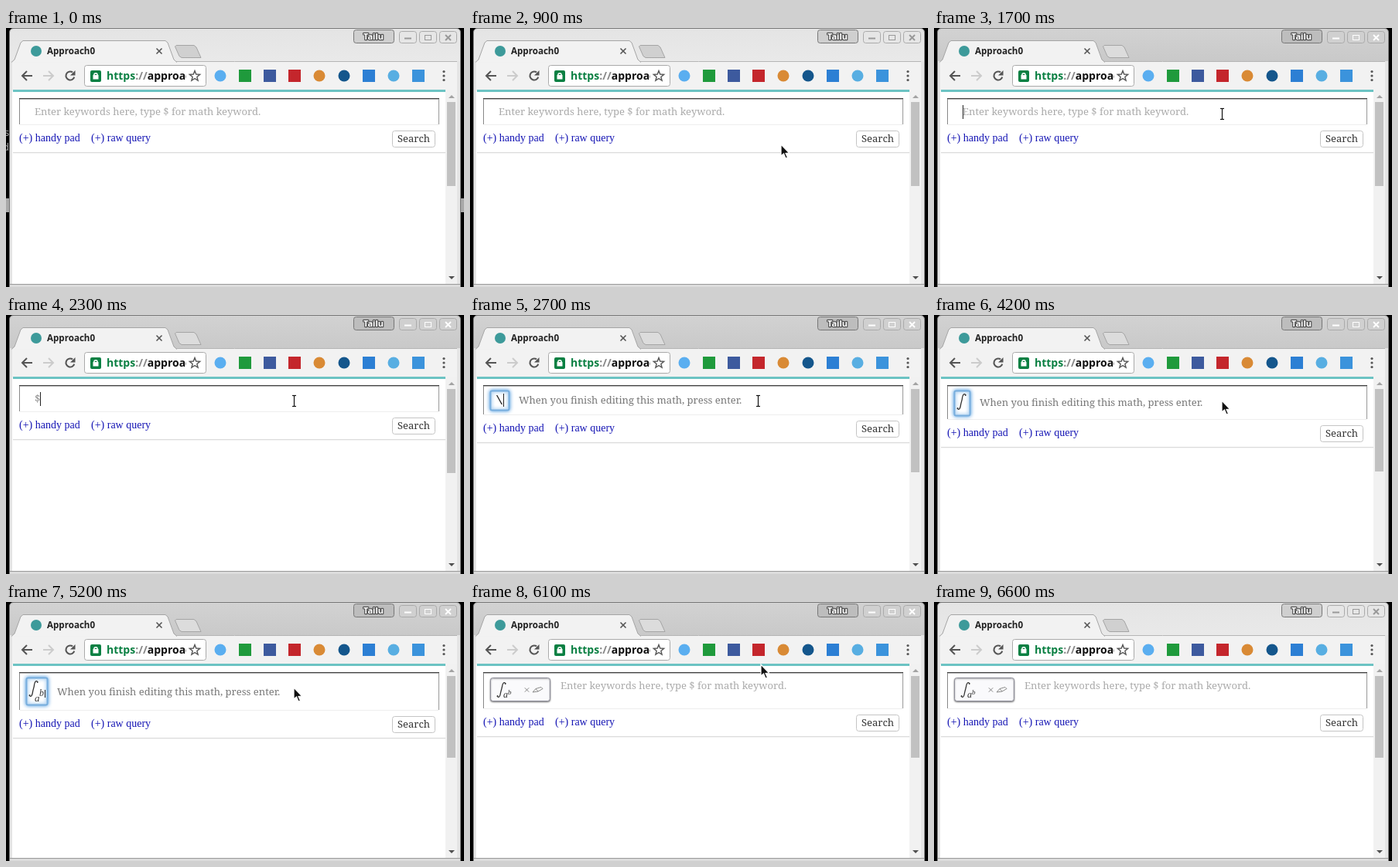
An HTML page with a canvas for the animation above (6.7 s loop, 592x336 px).

```html
<!DOCTYPE html>
<html lang="en">
<head>
<meta charset="utf-8">
<title>Math search box</title>
<style>
  html, body { margin: 0; width: 100%; height: 100%; overflow: hidden; background: #000; }
  canvas { display: block; width: 592px; height: 336px; }
</style>
</head>
<body>
<canvas id="stage" width="592" height="336"></canvas>
<script>
const ctx = document.getElementById('stage').getContext('2d');
const LOOP = 6700, STEP = 100;
const SANS = '"Noto Sans", "Open Sans", sans-serif';
const SERIF = '13px "Noto Serif", serif';
const ROMAN = '"Liberation Serif", "Times New Roman", serif';
const MONO = '16.6px "Liberation Mono", "Courier New", monospace';

const PROMPT = 'Enter keywords here, type $ for math keyword.';
const HINT = 'When you finish editing this math, press enter.';

// Editor states: dh = extra page height, thumb = bottom of scroll thumb
const STATES = [
  { at: 0, dh: 0, thumb: 205, prompt: 37 },
  { at: 2200, dh: 0, thumb: 205, text: '$' },
  { at: 2400, dh: 3, thumb: 205, box: 41, tex: '' },
  { at: 2700, dh: 4, thumb: 204, box: 51, tex: '\\' },
  { at: 3000, dh: 4, thumb: 204, box: 61, tex: '\\i' },
  { at: 3200, dh: 4, thumb: 204, box: 71, tex: '\\in' },
  { at: 3500, dh: 4, thumb: 204, box: 81, tex: '\\int' },
  { at: 3800, dh: 10, thumb: 203, box: 47, math: '' },
  { at: 4600, dh: 13, thumb: 202, box: 48, math: '_' },
  { at: 4700, dh: 13, thumb: 202, box: 49, math: 'a' },
  { at: 5100, dh: 15, thumb: 202, box: 52, math: 'a^' },
  { at: 5200, dh: 15, thumb: 202, box: 54, math: 'ab' },
  { at: 5700, dh: 13, thumb: 202, prompt: 117, chip: true }
];

// Pointer path: time, x, y
const PATH = [
  [300, 145, 291], [500, 262, 222], [700, 386, 166], [800, 409, 152],
  [900, 402, 151], [1100, 401, 152], [1600, 372, 111],
  [6000, 372, 111], [6300, 384, 22]
];

function rect(x, y, w, h, color) {
  ctx.fillStyle = color;
  ctx.fillRect(x, y, w, h);
}

function round(x, y, w, h, r, fill, stroke) {
  ctx.beginPath();
  ctx.roundRect(x, y, w, h, r);
  paint(fill, stroke);
}

function poly(points, fill, stroke, open) {
  ctx.beginPath();
  points.forEach(([x, y]) => ctx.lineTo(x, y));
  if (!open) ctx.closePath();
  paint(fill, stroke);
}

function circle(x, y, r, fill, stroke) {
  ctx.beginPath();
  ctx.arc(x, y, r, 0, Math.PI * 2);
  paint(fill, stroke);
}

function paint(fill, stroke) {
  if (fill) { ctx.fillStyle = fill; ctx.fill(); }
  if (stroke) { ctx.strokeStyle = stroke; ctx.stroke(); }
}

function line(points, color, width = 1) {
  ctx.lineWidth = width;
  poly(points, null, color, true);
  ctx.lineWidth = 1;
}

function text(str, x, y, font, color) {
  ctx.font = font;
  ctx.fillStyle = color;
  ctx.fillText(str, x, y);
  return x + ctx.measureText(str).width;
}

function vertical(y0, y1, from, to) {
  const g = ctx.createLinearGradient(0, y0, 0, y1);
  g.addColorStop(0, from);
  g.addColorStop(1, to);
  return g;
}

function backdrop(t) {
  rect(0, 0, 592, 336, '#000');
  if (t >= 100) return;
  text('s', -2, 140, '13px ' + SANS, '#aaa');
  text('d', -4, 159, '13px ' + SANS, '#aaa');
  rect(0, 221, 592, 18, '#aaa');
}

function titleBar(active) {
  const bar = active ? vertical(1, 43, '#d2d2d2', '#c9c9c9') : vertical(1, 43, '#e4e4e4', '#e9e9e9');
  round(4.5, 0.5, 583, 338, [5, 5, 0, 0], bar, '#777');
  rect(5, 43, 3, 293, '#e4e4e4');
  rect(583, 43, 4, 293, '#e4e4e4');
  rect(5, 333, 582, 3, '#dcdcdc');
  rect(5, 332, 582, 1, '#999');

  round(449.5, 2.5, 52, 17, 3, active ? '#bdbdbd' : '#cfcfcf', '#777');
  ctx.font = 'bold 11px ' + SANS;
  ctx.textAlign = 'center';
  ctx.lineWidth = 2.5;
  ctx.lineJoin = 'round';
  ctx.strokeStyle = '#555';
  ctx.strokeText('Tailu', 475, 15);
  text('Tailu', 475, 15, ctx.font, '#fff');
  ctx.textAlign = 'left';
  ctx.lineWidth = 1;
  ctx.lineJoin = 'miter';

  const edge = '#aaa', mark = active ? '#fff' : '#999';
  [508.5, 534.5, 560.5].forEach(x => round(x, 4.5, 22, 15, 3, active ? '#d0d0d0' : '#e6e6e6', edge));
  line([[515, 13.5], [524, 13.5]], mark, 2);
  ctx.strokeStyle = mark;
  ctx.strokeRect(541.5, 9.5, 8, 6);
  cross(571.5, 12.5, 3.5, mark, 2);
}

function cross(x, y, r, color, width) {
  line([[x - r, y - r], [x + r, y + r]], color, width);
  line([[x - r, y + r], [x + r, y - r]], color, width);
}

function tabs(active) {
  rect(8, 43, 575, 38, '#f2f2f2');
  line([[8, 43.5], [583, 43.5]], '#b5b5b5');
  poly([[7, 44.5], [11, 41], [19, 19], [22, 16.5], [206, 16.5], [209, 19], [217, 41], [221, 44.5]], '#f2f2f2', '#a5a5a5', true);
  poly([[218.5, 24], [220, 22.5], [243, 22.5], [246, 25], [252, 38.5], [227, 38.5], [224, 36.5]],
    active ? '#dcdcdc' : '#d0d0d0', '#a5a5a5');
  circle(39, 30, 7, '#3d9a9a');
  text('Approach0', 53, 34, 'bold 11.6px ' + SANS, '#222');
  cross(198, 30, 3.5, '#555', 1.6);
}

function toolbar() {
  arrow(27, 1, '#555');
  arrow(55, -1, '#ccc');
  ctx.lineWidth = 2;
  ctx.beginPath();
  ctx.arc(83, 62, 5.5, 0.3, 5.3);
  paint(null, '#555');
  ctx.lineWidth = 1;
  poly([[89.5, 55], [89.5, 61.5], [83, 61.5]], '#555');

  round(101.5, 48.5, 157, 27, 3, '#fff', '#aaa');
  round(109, 55, 14, 15, 2, '#0b8043');
  rect(112.5, 61, 7, 5.5, '#fff');
  ctx.lineWidth = 1.4;
  ctx.beginPath();
  ctx.arc(116, 61, 2.2, Math.PI, 0);
  paint(null, '#fff');
  ctx.lineWidth = 1;

  ctx.save();
  ctx.beginPath();
  ctx.rect(128, 50, 105, 24);
  ctx.clip();
  const url = 'bold 14px ' + SANS;
  let x = text('https', 130, 67, url, '#0b8043');
  x = text('://', x, 67, url, '#888');
  text('approach0', x, 67, url, '#111');
  ctx.restore();

  const star = [];
  for (let i = 0; i < 10; i++) {
    const r = i % 2 ? 3 : 7, a = i * Math.PI / 5 - Math.PI / 2;
    star.push([244 + r * Math.cos(a), 62.5 + r * Math.sin(a)]);
  }
  ctx.lineWidth = 1.4;
  poly(star, null, '#555');
  ctx.lineWidth = 1;

  const marks = ['#5aaef0', '#1f9a3c', '#3d5a9e', '#c4262c', '#d98a35', '#14568c', '#2c7fd4', '#58aee2', '#3b93dc'];
  marks.forEach((color, i) => {
    const cx = 277 + i * 32;
    if ([0, 4, 5, 7].includes(i)) circle(cx, 62, 7.5, color);
    else rect(cx - 8, 54, 16, 16, color);
  });
  [56.5, 62, 67.5].forEach(y => circle(566, y, 1.6, '#555'));
}

function arrow(x, dir, color) {
  line([[x - 6 * dir, 62], [x + 7 * dir, 62]], color, 2);
  line([[x, 56], [x - 6 * dir, 62], [x, 68]], color, 2);
}

function page(s) {
  rect(8, 81, 575, 251, '#fff');
  rect(9, 80, 559, 3, '#6cc3c3');

  rect(568, 81, 15, 251, '#f1f1f1');
  rect(570, 96, 11, s.thumb - 96, '#c1c1c1');
  poly([[572, 91], [580, 91], [576, 87]], '#a3a3a3');
  poly([[572, 322], [580, 322], [576, 326]], '#505050');

  const bottom = 125 + s.dh;
  rect(17, 91, 543, 1, '#3f3f3f');
  rect(17, 92, 543, 1, '#bbb');
  rect(17, 92, 1, bottom - 92, '#888');
  rect(559, 92, 1, bottom - 92, '#999');
  rect(18, bottom, 541, 1, '#eee');

  const link = '14px ' + ROMAN, base = 147 + s.dh;
  text('(+) handy pad', 17, base, link, '#1414b4');
  text('(+) raw query', 110, base, link, '#1414b4');
  round(499.5, 133.5 + s.dh, 55, 21, 3, '#fff', '#c4c4c4');
  text('Search', 506, 148 + s.dh, SERIF, '#333');
  rect(9, 161 + s.dh, 559, 1, '#dcdcdc');
  rect(9, 162 + s.dh, 559, 1, '#f3f3f3');
}

function integral(x, y, h) {
  ctx.lineWidth = 1.3;
  ctx.beginPath();
  ctx.moveTo(x + 11, y + 2);
  ctx.bezierCurveTo(x + 9, y - 1, x + 7, y + 1, x + 6.3, y + h * 0.35);
  ctx.lineTo(x + 4.7, y + h * 0.65);
  ctx.bezierCurveTo(x + 4, y + h - 1, x + 2, y + h + 1, x, y + h - 2);
  paint(null, '#333');
  ctx.lineWidth = 1;
  circle(x + 10.7, y + 2, 0.9, '#333');
  circle(x + 0.6, y + h - 2, 0.9, '#333');
}

function caret(x, y, h) {
  rect(x, y, 1, h, '#222');
}

function mathBox(s, blink) {
  const h = s.tex !== undefined ? 26 : s.math ? 36 : 33;
  ctx.save();
  ctx.shadowColor = '#4f9be0';
  ctx.shadowBlur = 5;
  ctx.lineWidth = 2;
  round(26.5, 98.5, s.box - 27, h - 1, 2, '#fff', '#78aedd');
  ctx.restore();

  if (s.tex !== undefined) {
    const end = text(s.tex, 33, 116, MONO, '#222');
    if (blink) caret(Math.round(end), 102, 17);
    text(HINT, s.box + 12, 115, SERIF, '#777');
    return;
  }
  const italic = size => `italic ${size}px ${ROMAN}`;
  integral(30, 102, 21);
  if (!s.math) {
    if (blink) caret(43, 103, 20);
  } else if (s.math === '_') {
    rect(37, 119, 6, 11, '#ddd');
  } else {
    text('a', 37, 129, italic(13), '#333');
    if (s.math === 'ab') text('b', 43, 122, italic(12), '#333');
    const up = s.math.length > 1;
    if (blink) caret(s.math === 'ab' ? 50 : 44, up ? 114 : 120, 10);
  }
  text(HINT, s.box + 12, s.math ? (s.dh > 13 ? 121 : 120) : 118, SERIF, '#777');
}

function chip() {
  ctx.save();
  ctx.shadowColor = 'rgba(0,0,0,.45)';
  ctx.shadowBlur = 2;
  ctx.shadowOffsetY = 1;
  round(26.5, 98.5, 77, 30, 3, '#fafafc', '#8c8c98');
  ctx.restore();
  integral(35, 104, 20);
  text('a', 43, 124, `italic 12px ${ROMAN}`, '#333');
  text('b', 49, 120, `italic 9px ${ROMAN}`, '#333');
  cross(73.5, 114, 2.7, '#888', 1);
  poly([[81, 117], [85, 112.5], [92, 110.5], [94, 112.5], [88, 116]], '#fff', '#888');
  line([[85, 112.5], [88, 116]], '#888');
}

function pointer(t) {
  if (t < 300 || t >= 6400) return;
  const i = Math.max(1, PATH.findIndex(p => p[0] >= t));
  const [t0, x0, y0] = PATH[i - 1], [t1, x1, y1] = PATH[i];
  const k = (t - t0) / (t1 - t0);
  const x = Math.round(x0 + (x1 - x0) * k), y = Math.round(y0 + (y1 - y0) * k);
  if (y < 125 && t < 3900) return beam(x, y);
  const shape = [[0, 0], [0, 15], [3.5, 12], [6, 18], [8.5, 17], [6, 11.5], [10.5, 11]];
  ctx.lineWidth = 1.2;
  poly(shape.map(([a, b]) => [x + a, y + b]), '#111', '#fff');
  ctx.lineWidth = 1;
}

function beam(x, y) {
  const ends = (color, w) => {
    line([[x + 0.5, y - 6], [x + 0.5, y + 7]], color, w);
    [y - 6.5, y + 7.5].forEach(v => line([[x - 2, v], [x + 3, v]], color, w));
  };
  ends('#fff', 3);
  ends('#111', 1.2);
}

function draw(t) {
  const s = STATES.filter(v => v.at <= t).pop();
  const active = t >= 1700 && t < 6400;
  const blink = active && !(t >= 4200 && t < 4400) && !(t >= 5400 && t < 5700);
  backdrop(t);
  titleBar(active);
  tabs(active);
  toolbar();
  page(s);
  if (s.prompt) text(PROMPT, s.prompt, 113, SERIF, '#aaa');
  if (s.text) {
    text(s.text, 37, 113, SERIF, '#888');
    caret(44, 100, 18);
  } else if (blink && t < 2200) {
    caret(37, 100, 18);
  }
  if (s.box) mathBox(s, blink);
  if (s.chip) chip();
  pointer(t);
}

const start = performance.now();
function tick(now) {
  const t = Math.max(0, now - start) % LOOP;
  draw(Math.floor(t / STEP) * STEP);
  requestAnimationFrame(tick);
}
draw(0);
requestAnimationFrame(tick);
</script>
</body>
</html>
```
